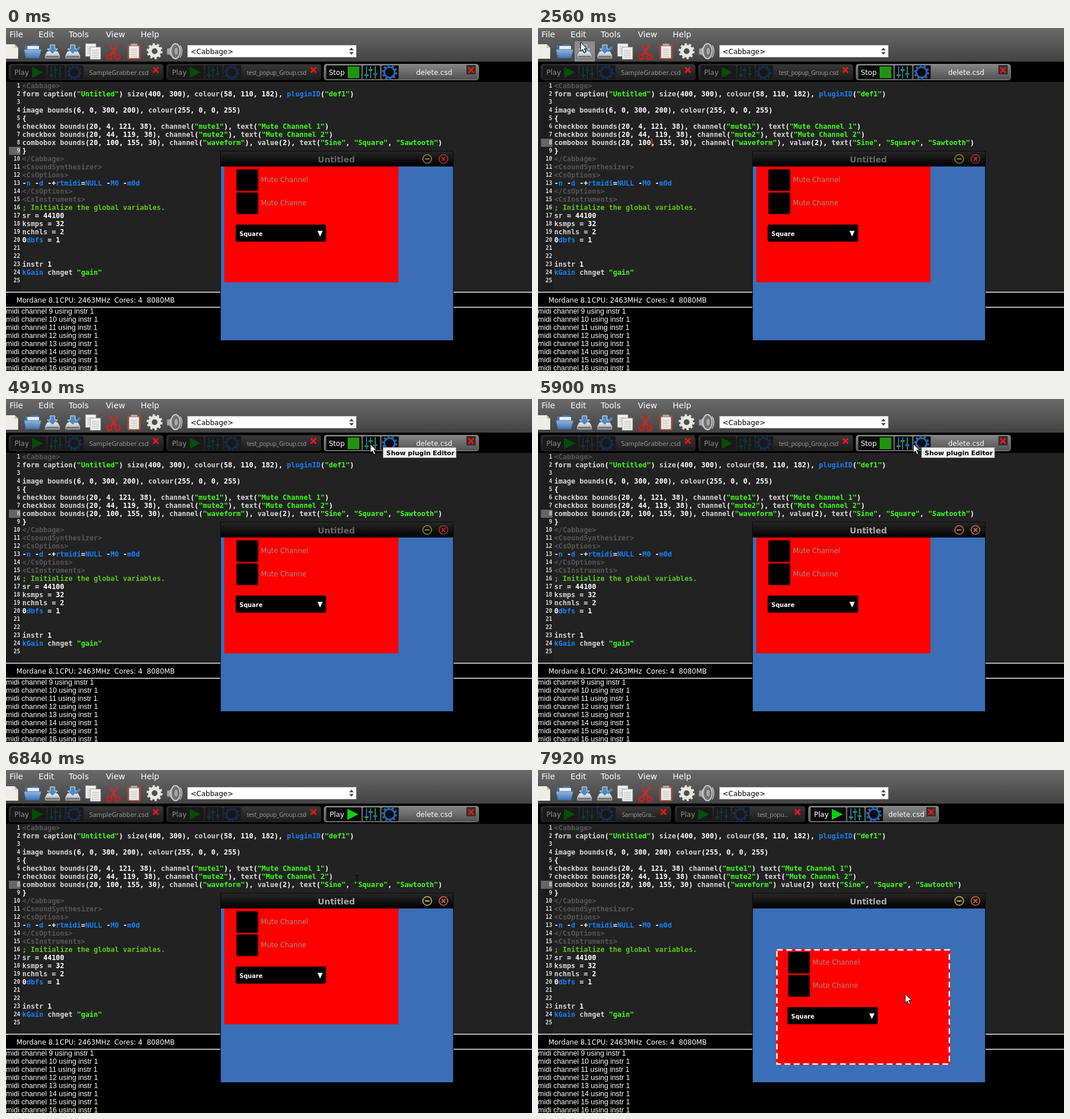
These frames come from a looping animation (906x592 px, 8 s). An HTML page:

```html
<!DOCTYPE html>
<html lang="en">
<head>
<meta charset="utf-8">
<title>Plugin editor</title>
<style>
html, body { margin: 0; width: 100%; height: 100%; overflow: hidden; background: #000; }
svg { display: block; width: 906px; height: 592px; }
text { font: 12px "DejaVu Sans", sans-serif; white-space: pre; }
.menu { font-size: 14px; }
.small { font-size: 11.75px; }
.code { font: bold 12.03px "DejaVu Sans Mono", monospace; }
.num { font: bold 9.6px "DejaVu Sans Mono", monospace; text-anchor: end; }
.log { font: 12.5px "Liberation Sans", Arial, sans-serif; }
.tip { font-weight: bold; font-size: 11px; }
.title { font-weight: bold; font-size: 14px; text-anchor: middle; }
.value { font-weight: bold; font-size: 10px; }
.mid { text-anchor: middle; }
.dim { font: 11.2px "Open Sans", sans-serif; text-anchor: middle; }
.tight { font-size: 10.2px; letter-spacing: -.2px; }
</style>
</head>
<body>
<svg viewBox="0 0 906 592" xmlns="http://www.w3.org/2000/svg">
  <defs>
    <linearGradient id="bar" x2="0" y2="1"><stop stop-color="#6a6a6a"/><stop offset="1" stop-color="#434343"/></linearGradient>
    <linearGradient id="on" x2="0" y2="1"><stop stop-color="#868686"/><stop offset="1" stop-color="#505050"/></linearGradient>
    <linearGradient id="off" x2="0" y2="1"><stop stop-color="#383838"/><stop offset="1" stop-color="#1c1c1c"/></linearGradient>
    <linearGradient id="head" x2="0" y2="1"><stop stop-color="#262626"/><stop offset="1" stop-color="#000"/></linearGradient>
    <linearGradient id="folder" x2="0" y2="1"><stop stop-color="#8fb8e0"/><stop offset="1" stop-color="#3f72b0"/></linearGradient>
    <linearGradient id="metal" x2="0" y2="1"><stop stop-color="#f2f2f2"/><stop offset="1" stop-color="#9a9a9a"/></linearGradient>
  </defs>
  <rect width="906" height="592"/>
  <rect width="906" height="58" fill="url(#bar)"/>
  <rect id="hover" x="63" y="23" width="35" height="35" fill="#8c8c8c"/>
  <g id="tools"></g>
  <g id="tabs"></g>
  <rect y="93" width="906" height="362" fill="#222"/>
  <rect y="93" width="26" height="362" fill="#1d1d1d"/>
  <rect id="mark" x="5" width="20" height="14" fill="#666"/>
  <g id="nums"></g>
  <g id="code"></g>
  <rect id="caret" x="195.5" y="191" width="1.5" height="14" fill="#f33"/>
  <rect y="455" width="906" height="2" fill="#b4b4b4"/>
  <rect y="481" width="906" height="2" fill="#b4b4b4"/>
  <g id="log"></g>
  <g id="win">
    <rect x="369" y="212" width="402" height="327" fill="#0a0a0a"/>
    <rect x="370" y="213" width="400" height="26" fill="url(#head)"/>
    <g id="caption"></g>
    <rect x="370" y="239" width="400" height="300" fill="#3a6eb6"/>
    <g id="panel"></g>
  </g>
  <g id="tip"></g>
  <path id="arrow" d="M.5 .5V16L4 12.7 6.7 18.6 9.3 17.5 6.7 11.7H11.6Z" fill="#fff" stroke="#000"/>
  <path id="beam" d="M-3-8.5Q0-8.5 0-6.5Q0-8.5 3-8.5M0-6.5V6.5M-3 8.5Q0 8.5 0 6.5Q0 8.5 3 8.5" fill="none" stroke="#000"/>
</svg>
<script>
const LOOP = 8000;
const $ = id => document.getElementById(id);
const esc = s => s.replace(/&/g, '&amp;').replace(/</g, '&lt;');
const text = (x, y, s, fill, cls = '') => `<text x="${x}" y="${y}" fill="${fill}" class="${cls}">${esc(s)}</text>`;
const rect = (x, y, w, h, fill, more = '') => `<rect x="${x}" y="${y}" width="${w}" height="${h}" fill="${fill}" ${more}/>`;
const path = (d, fill, more = '') => `<path d="${d}" fill="${fill}" ${more}/>`;
const ring = (x, y, r, color, w, more = '') =>
  `<circle cx="${x}" cy="${y}" r="${r}" fill="none" stroke="${color}" stroke-width="${w}" ${more}/>`;
const stroke = (color, w) => `stroke="${color}" stroke-width="${w}"`;

// Ring with ten teeth
const gear = (x, y, r, color, w) => ring(x, y, r, color, w) +
  ring(x, y, r + w / 2 + 1, color, 3.5, `stroke-dasharray="${(r + w / 2 + 1) * Math.PI / 10}"`);

// Redraw a group only when its content changes
const shown = {};
function put(id, html) {
  if (shown[id] !== html) $(id).innerHTML = shown[id] = html;
}
const show = (id, on) => $(id).setAttribute('visibility', on ? 'visible' : 'hidden');

function drive(x) {
  return path(`M${x + 4} 40H${x + 22}L${x + 26} 47V53H${x}V47Z`, 'url(#metal)', stroke('#555', .8)) +
    rect(x + 2, 48, 22, 3, '#6d7880') +
    path(`M${x + 9} 29H${x + 17}V36H${x + 22}L${x + 13} 45 ${x + 4} 36H${x + 9}Z`, '#4d8bc6', stroke('#dce8f2', 1));
}
const sheet = (x, y, w, h) => {
  let s = rect(x, y, w, h, '#f0f0ee', stroke('#999', .8));
  for (let i = 5; i < h - 2; i += 3) s += rect(x + 3, y + i, w - 6, 1, '#bbb');
  return s;
};

function tools() {
  const menu = [['File', 6], ['Edit', 56], ['Tools', 108], ['View', 172], ['Help', 232]];
  return menu.map(([s, x]) => text(x, 16, s, '#fff', 'menu')).join('') +
    path('M0 28H15L21 34V53H0Z', '#eeeee6') + path('M15 28V34H21Z', '#c4c4b8') +
    path('M33 30H42L44 28H55V45H33Z', '#4a78ae') + path('M37 31H57V42H37Z', '#e9eef2') +
    path('M31 37H61L57 52H34Z', 'url(#folder)', stroke('#3b6596', .8)) +
    drive(67) + drive(102) + path('M119 40L126 31 129 34 121 42Z', '#4d8bc6') +
    sheet(137, 27, 18, 22) + sheet(145, 33, 18, 21) +
    path('M178 28L189 46M194 28L181 46', 'none', stroke('#cc2a2a', 3)) +
    ring(178, 50, 4, '#d01c1c', 3) + ring(192, 50, 4, '#d01c1c', 3) +
    rect(209, 28, 23, 26, '#a8442c', 'rx="2"') + sheet(212, 31, 17, 21) + rect(215, 27, 11, 5, '#aaa', 'rx="1"') +
    gear(256, 40, 8, '#e8e8e2', 6) +
    path('M277 35H281L289 28V53L281 46H277Z', '#a9a9a9', stroke('#555', 1)) +
    `<ellipse cx="292" cy="40" rx="8" ry="13" fill="#777" stroke="#ccc" stroke-width="2"/>` +
    `<ellipse cx="293" cy="40" rx="4" ry="7" fill="#a5a5a5" stroke="#444"/>` +
    path('M300 30Q306 40 300 51', 'none', stroke('#ccc', 1.5)) +
    rect(312.5, 29.5, 291, 21, '#fff', stroke('#888', 1)) +
    text(318, 45, '<Cabbage>', '#000') +
    path('M591 38.5L595 34 599 38.5ZM591 41.5L595 46 599 41.5Z', '#444');
}

function tab(x, w, name, active, running, cls) {
  const mid = x + w / 2 + 56.5, end = x + w - 14, face = active ? '#0b0b0b' : '#191919';
  let s = rect(x + 1, 62.5, w - 2, 27, `url(#${active ? 'on' : 'off'})`, `rx="4" ${stroke(active ? '#8f8f8f' : '#222', 1)}`);
  [[4, 61], [67, 30], [99, 30]].forEach(([dx, bw]) =>
    s += rect(x + dx + .5, 64.5, bw, 24, face, `rx="2" ${stroke(active ? '#4c4c4c' : '#202020', 1)}`));
  s += text(x + (running ? 9 : 10.5), 81, running ? 'Stop' : 'Play', active ? '#fff' : '#8f8f8f');
  s += running ? rect(x + 42, 67, 19, 19, '#229310', stroke('#2fae18', .8))
    : path(`M${x + 41} 67V86L${x + 60} 76.5Z`, active ? '#0bd00b' : '#064d06');
  const blue = active ? '#2864b4' : '#162d4c', green = active ? '#1f9a2c' : '#103c1c';
  [[74, 80], [81, 71], [89, 78]].forEach(([dx, y], i) =>
    s += rect(x + dx - 1, 66, 2, 21, i == 2 ? green : blue) + rect(x + dx - 3.5, y, 7, 3, i == 2 ? blue : green));
  s += gear(x + 113.5, 76.5, 9, blue, 3);
  s += text(mid, 81, name, active ? '#fff' : '#9c9c9c', cls);
  if (active) s += rect(end - 8, 64, 16, 16, '#303030');
  return s + path(`M${end - 4.5} 68L${end + 4.5} 77M${end + 4.5} 68L${end - 4.5} 77`, 'none', stroke('#f01414', 3));
}

function tabs(narrow, running) {
  const w = narrow ? 226 : 268, xs = narrow ? [4, 235, 465] : [4, 275.5, 547];
  return tab(xs[0], w, narrow ? 'SampleGra...' : 'SampleGrabber.csd', false, false, narrow ? 'dim tight' : 'dim') +
    tab(xs[1], w, narrow ? 'test_popu...' : 'test_popup_Group.csd', false, false, 'dim tight') +
    tab(xs[2], w, 'delete.csd', true, running, 'mid');
}

const source = `<Cabbage>
form caption("Untitled") size(400, 300), colour(58, 110, 182), pluginID("def1")

image bounds(6, 0, 300, 200), colour(255, 0, 0, 255)
{
checkbox bounds(20, 4, 121, 38), channel("mute1"), text("Mute Channel 1")
checkbox bounds(20, 44, 119, 38), channel("mute2"), text("Mute Channel 2")
combobox bounds(20, 100, 155, 30), channel("waveform"), value(2), text("Sine", "Square", "Sawtooth")
}
</Cabbage>
<CsoundSynthesizer>
<CsOptions>
-n -d -+rtmidi=NULL -M0 -m0d
</CsOptions>
<CsInstruments>
; Initialize the global variables.
sr = 44100
ksmps = 32
nchnls = 2
0dbfs = 1


instr 1
kGain chnget "gain"
`.split('\n');
const opcode = /^(pluginID|n|d|rtmidi|NULL|M0|m0d|dbfs|kGain)$/;
function tint(word) {
  if (word[0] == '"') return '#3cff14';
  if (word[0] == ';') return '#5cc814';
  if (word[0] == '<') return '#565656';
  if (opcode.test(word)) return '#1482f5';
  return /^[a-z]/i.test(word) ? '#d6d6d6' : '#fff';
}
const codeLine = (s, i) => `<text class="code" x="28" y="${104 + 14 * i}">` +
  (s.match(/"[^"]*"|;.*|<\/?\w+>|[a-z]\w*|[^a-z"<;]+/gi) || [])
    .map(w => `<tspan fill="${tint(w)}">${esc(w)}</tspan>`).join('') + '</text>';
const code = edited => source.map((s, i) => codeLine(edited && i > 2 ? s.replace(/\),/g, ')') : s, i)).join('');

function caption(name, min, close) {
  return text(569, 232, 'Untitled', name, 'title') +
    ring(725.5, 226, 7.5, min, 1.6) + rect(721.5, 225, 8, 2, min) +
    ring(753.5, 226, 7.5, close, 1.6) +
    path('M750.5 223L756.5 229M756.5 223L750.5 229', 'none', stroke(close, 2));
}

function panel(dx, dy, picked) {
  const box = y => rect(397, y, 37, 37, '#000', `rx="2" ${stroke('#500', 1)}`);
  return `<g transform="translate(${dx} ${dy})">` + rect(376, 239, 300, 200, '#f00') +
    (picked ? rect(377.5, 240.5, 297, 197, 'none', stroke('#fff', 2.4) + ' stroke-dasharray="10 6"') : '') +
    box(244) + box(284) +
    text(439, 266, 'Mute Channel', '#a09080', 'small') + text(439, 306, 'Mute Channe', '#a09080', 'small') +
    rect(396, 339.5, 155, 29, '#000', `rx="2" ${stroke('#400', 1)}`) +
    text(402, 358.5, 'Square', '#fff', 'value') + path('M536.5 350H545.5L541 360Z', '#fff') + '</g>';
}

// Pointer moves: start, end, number of steps, way points
const moves = [
  [140, 380, 4, [[668, 552], [560, 470], [430, 380], [290, 305], [222, 287]]],
  [600, 1070, 7, [[222, 287], [207, 240], [196, 205]]],
  [1700, 2400, 10, [[196, 205], [232, 165], [250, 100], [190, 48], [90, 12], [45, 2]]],
  [2560, 2730, 3, [[45, 2], [73, 24], [76, 28], [78, 32]]],
  [2870, 3430, 8, [[78, 32], [180, 75], [340, 120], [470, 130], [533, 118]]],
  [3650, 4290, 9, [[533, 118], [700, 130], [794, 112], [740, 76], [660, 84]]],
  [4450, 4690, 5, [[660, 84], [640, 82], [627, 77]]],
  [5150, 5220, 2, [[627, 77], [631, 77]]],
  [5690, 5900, 4, [[631, 77], [646, 77]]],
  [5980, 6450, 7, [[646, 77], [656, 77], [655, 77]]],
  [6840, 6980, 3, [[655, 77], [605, 190], [545, 333], [571, 314]]],
  [7300, 7400, 2, [[571, 314], [585, 313], [596, 313]]],
  [7680, 7920, 4, [[596, 313], [604, 333], [611, 351], [622, 369], [632, 386]]]
];
function pointer(t) {
  const move = moves.filter(m => t >= m[0]).pop();
  if (!move) return moves[0][3][0];
  const [from, to, n, pts] = move;
  const step = Math.min(n - 1, Math.floor((t - from) / (to - from) * (n - 1) + 1e-6));
  const u = (step + 1) / n * (pts.length - 1), i = Math.min(Math.floor(u + 1e-6), pts.length - 2), f = u - i;
  return pts[i].map((a, k) => a + (pts[i + 1][k] - a) * f);
}

const tips = [
  [0], [4690, 649, 'Show plugin Editor'], [5220, 653, 'Show plugin Editor'], [5900, 660, 'Show plugin Editor'],
  [6060, 670, 'Show plugin Editor'], [6290, 677, 'Edit Plugin GUI'], [6530]
];
function tip(t) {
  const [, x, s] = tips.filter(p => t >= p[0]).pop();
  return s ? rect(x + .5, 83.5, s[0] == 'S' ? 126 : 104, 18, '#f0f0f0', stroke('#777', 1)) + text(x + 6, 97, s, '#000', 'tip') : '';
}

function draw(t) {
  const [x, y] = pointer(t), playing = t < 6530, dropped = t >= 7920;
  const open = t < 6450 || !playing;
  const inWin = open && x >= 369 && x < 771 && y >= 212 && y < 539;
  const beam = y > 93 && !inWin;
  put('tabs', tabs(dropped, playing));
  put('code', code(dropped));
  put('caption', t < 5150 ? caption('#666', '#8e8a34', '#b02c2c')
    : playing ? caption('#aaa', '#b87840', '#b87840') : caption('#aaa', '#d2b45c', '#d4604e'));
  const drag = dropped ? 1 : t >= 7840 ? .5 : 0;
  put('panel', panel(34 * drag, 70 * drag, t >= 7680));
  put('tip', tip(t));
  $('mark').setAttribute('y', t < 1540 ? 205 : 191);
  show('caret', t >= 1540 && t < 4910 && Math.floor((t - 1540) / 374.4) % 2 == 0);
  show('hover', x >= 63 && x < 98 && y >= 23 && y < 58);
  show('win', open);
  show('arrow', !beam);
  show('beam', beam);
  $(beam ? 'beam' : 'arrow').setAttribute('transform', `translate(${Math.round(x)} ${Math.round(y)})`);
}

put('tools', tools());
put('nums', source.map((_, i) => text(24.5, 103 + 14 * i, String(i + 1), '#d8d8d8', 'num')).join(''));
put('log', text(18, 474, 'Mordane 8.1', '#fff', 'small') + text(92.5, 474, 'CPU: 2463MHz  Cores: 4  8080MB', '#fff', 'small') +
  Array.from({ length: 8 }, (_, i) => text(0, 493 + 14 * i, `midi channel ${9 + i} using instr 1`, '#fff', 'log')).join(''));

const start = performance.now();
(function tick() {
  draw((performance.now() - start) % LOOP);
  requestAnimationFrame(tick);
})();
</script>
</body>
</html>
```
